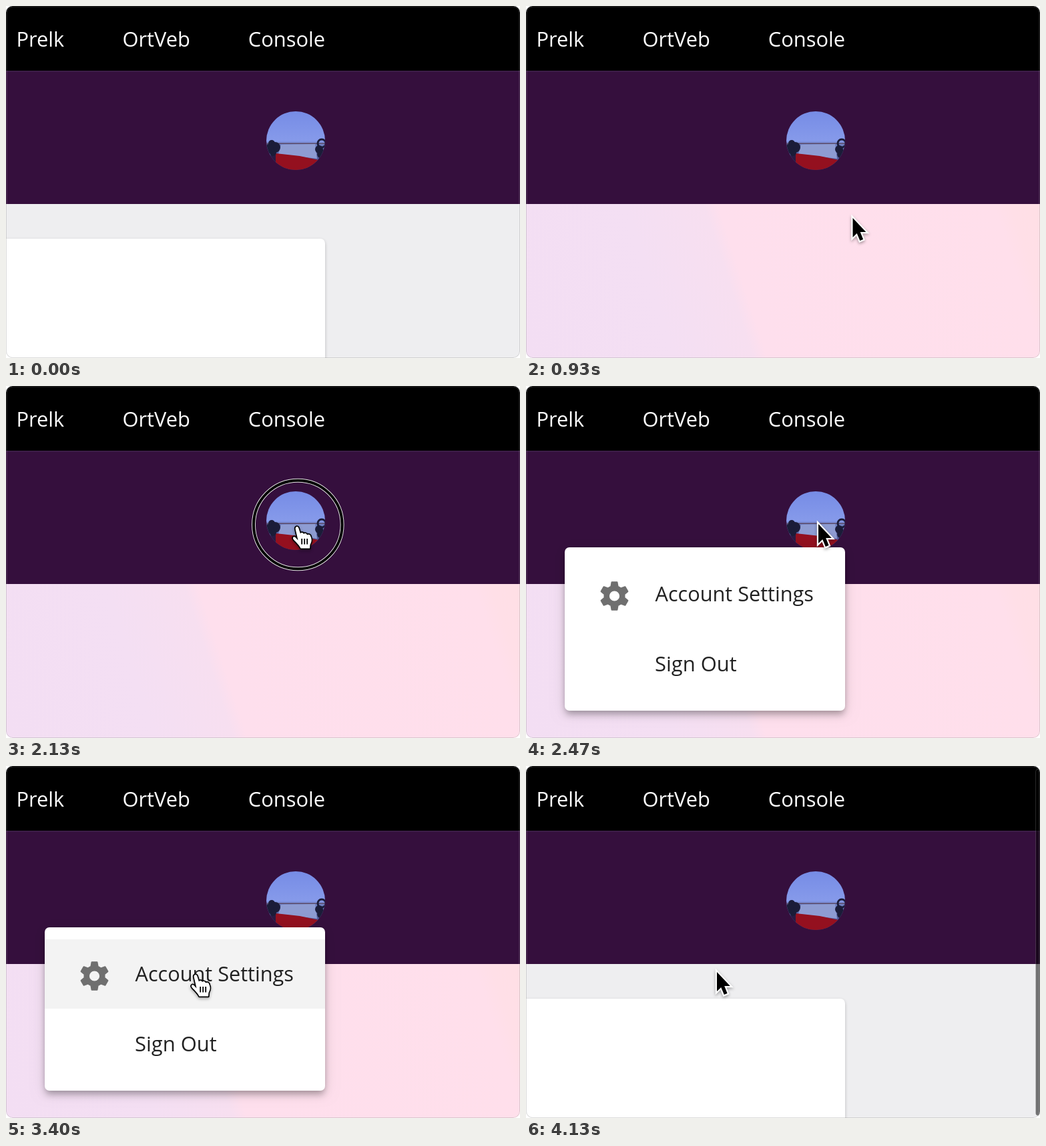
An HTML page with a canvas for the animation above (4.19 s loop, 770 by 528 pixels).

```html
<!DOCTYPE html>
<html lang="en">
<head>
<meta charset="utf-8">
<title>Account menu</title>
<style>
  html, body { margin: 0; width: 100%; height: 100%; overflow: hidden; background: #fff; }
  canvas { display: block; }
</style>
</head>
<body>
<canvas id="stage" width="770" height="528"></canvas>
<script>
const W = 770, H = 528, LOOP = 4190, TOP = 297;
const c = document.getElementById('stage').getContext('2d');

// Moments in ms
const T = {
  pink: 925, ring: 2052, open: 2340, hand: 2900, hover: 2960,
  ripple: 3611, close: 3810, grey: 3965
};

// Pointer path: time, x, y
const PATH = [
  [930, 489.5, 318], [1650, 438, 207], [2480, 438, 207],
  [2930, 310, 276], [3400, 286, 309]
];

const HAND = new Path2D(
  'M9.5 23 L5.7 6.5 C4.8 2.5 9 .8 10.3 4.5 L13 13 C13.5 10.8 17.5 10.8 18 13.8 ' +
  'C19 11.8 22.5 12.2 23 15 C24.5 13.5 28 14 28.4 17.5 C30.5 22 30 25 27.5 29.5 ' +
  'L27 35 H13.5 C12 31 7 26.5 3 22 C.5 19 3 16.5 5.5 18.5 Z');
const ARROW = new Path2D('M0 0 V29 L6.2 23 L10.8 34 L15.6 32 L11.2 21 H19.8 Z');
const GEAR = gearPath();

const clamp = v => Math.max(0, Math.min(1, v));
const smooth = p => p * p * (3 - 2 * p);

// cubic-bezier(0, 0, .2, 1)
function decelerate(x) {
  if (x <= 0) return 0;
  if (x >= 1) return 1;
  let lo = 0, hi = 1;
  for (let i = 0; i < 20; i++) {
    const u = (lo + hi) / 2;
    if (.6 * u * u * (1 - u) + u ** 3 < x) lo = u; else hi = u;
  }
  return 3 * lo * lo * (1 - lo) + lo ** 3;
}

function gearPath() {
  const path = new Path2D();
  path.arc(0, 0, 7.4, 0, 7);
  path.closePath();
  for (let i = 0; i < 6; i++) {
    const tooth = new Path2D('M-3.1 -5 L-2.3 -9.6 Q-2.2 -10 -1.8 -10 H1.8 Q2.2 -10 2.3 -9.6 L3.1 -5 Z');
    path.addPath(tooth, new DOMMatrix().rotate(i * 60));
  }
  path.moveTo(3.5, 0);
  path.arc(0, 0, 3.5, 0, -2 * Math.PI, true);
  return path;
}

function rect(x, y, w, h, color) {
  c.fillStyle = color;
  c.fillRect(x, y, w, h);
}

function box(x, y, w, h, r) {
  c.beginPath();
  c.roundRect(x, y, w, h, r);
}

function circle(x, y, r) {
  c.beginPath();
  c.arc(x, y, r, 0, 2 * Math.PI);
}

function poly(color, ...pts) {
  c.fillStyle = color;
  c.beginPath();
  for (let i = 0; i < pts.length; i += 2) c.lineTo(pts[i], pts[i + 1]);
  c.fill();
}

function text(str, x, y, size, color) {
  c.font = `${size}px "Open Sans", "Noto Sans", sans-serif`;
  c.fillStyle = color;
  c.fillText(str, x, y);
}

// Draws only the shadow; the shape itself lies off stage.
function shadow(x, y, w, h, r, dy, blur, spread, alpha, scale = 1) {
  const far = 3000;
  c.save();
  c.shadowColor = `rgba(0,0,0,${alpha})`;
  c.shadowBlur = blur * scale;
  c.shadowOffsetX = far * scale;
  c.shadowOffsetY = dy * scale;
  c.fillStyle = '#000';
  box(x - far - spread, y - spread, w + 2 * spread, h + 2 * spread, r);
  c.fill();
  c.restore();
}

function drawPage(pink) {
  if (pink) {
    const g = c.createLinearGradient(-161.8, 52, 619, -199);
    [[0, '#f3def3'], [.27, '#f4dff3'], [.405, '#f7dff0'], [.43, '#fedfed'],
     [.91, '#ffdfeb'], [.94, '#ffdfe7'], [1, '#ffdfe5']].forEach(s => g.addColorStop(...s));
    rect(0, TOP, W, H - TOP, g);
    return;
  }
  rect(0, TOP, W, H - TOP, '#eeeef0');
  shadow(-40, 349, 518, 260, 7, 2, 5, 0, .22);
  c.fillStyle = '#fff';
  box(-40, 349, 518, 260, 7);
  c.fill();
}

function drawHeader() {
  rect(0, 0, W, 98, '#000');
  rect(0, 98, W, TOP - 98, '#350f3d');
  rect(0, 97, W, 2, '#3c1c48');
  text('Prelk', 15.5, 61, 30.8, '#fff');
  text('OrtVeb', 174.5, 61, 30.8, '#fff');
  text('Console', 362.8, 61, 30.8, '#fff');
}

function drawAvatar() {
  c.save();
  circle(434, 202, 44);
  c.clip();
  const sky = c.createLinearGradient(0, 158, 0, 246);
  sky.addColorStop(0, '#768ce6');
  sky.addColorStop(.5, '#869aea');
  sky.addColorStop(.56, '#6f80c4');
  sky.addColorStop(1, '#3a3f78');
  rect(390, 158, 88, 88, sky);
  poly('#8e9cd2', 412, 208, 463, 207, 466, 229, 408, 222);
  rect(390, 205.5, 88, 1.5, '#5c4a66');
  poly('#94101f', 404, 221, 440, 225, 468, 231, 468, 250, 404, 250);
  poly('#2a1a42', 390, 226, 404, 222, 404, 250, 390, 250);
  c.fillStyle = '#1b1c38';
  for (const [x, y, r] of [[398, 206, 5], [403, 212, 8], [394, 214, 7], [400, 220, 5], [469, 215, 6], [473, 222, 7]]) {
    circle(x, y, r);
    c.fill();
  }
  c.strokeStyle = '#1b1c38';
  c.lineWidth = 3;
  circle(473, 206, 6);
  c.stroke();
  c.restore();
}

function drawMenu(t) {
  const shown = clamp((t - T.open) / 125);
  const alpha = Math.min(shown, 1 - clamp((t - T.close) / 110));
  if (alpha <= 0) return;
  const s = .8 + .2 * decelerate(shown);
  const x = 58, y = 242, w = 420, h = 245;
  c.save();
  c.globalAlpha = alpha;
  c.translate(x + w, y);
  c.scale(s, s);
  c.translate(-x - w, -y);
  shadow(x, y, w, h, 7, 4, 8, -2, .2, s);
  shadow(x, y, w, h, 7, 8, 10, 0, .14, s);
  shadow(x, y, w, h, 7, 2, 20, 0, .12, s);
  c.fillStyle = '#fff';
  box(x, y, w, h, 7);
  c.fill();
  if (t >= T.hover) rect(x, 260, w, 104, '#f3f3f3');
  if (t >= T.ripple) {
    c.save();
    c.beginPath();
    c.rect(x, 260, w, 104);
    c.clip();
    c.fillStyle = 'rgba(0,0,0,.105)';
    circle(285, 310, 233 * decelerate((t - T.ripple) / 225));
    c.fill();
    c.restore();
  }
  c.save();
  c.translate(132.5, 315);
  c.scale(2.17, 2.17);
  c.fillStyle = '#6f6f6f';
  c.fill(GEAR);
  c.restore();
  text('Account Settings', 193.5, 323, 30.7, '#212121');
  text('Sign Out', 193, 428, 30.9, '#212121');
  c.restore();
}

function drawRing(t) {
  const p = (t - T.ring) / 140;
  if (p <= 0 || p > 1.5) return;
  const r = 68.8 * (1 - (1 - Math.min(p, 1)) ** 4);
  c.save();
  c.globalAlpha = 1 - clamp((p - 1) / .5);
  circle(437.3, 208, r);
  for (const [color, width] of [['#e4e4e4', 5.9], ['#000', 4]]) {
    c.strokeStyle = color;
    c.lineWidth = width;
    c.stroke();
  }
  c.restore();
}

function pointerAt(t) {
  let i = 0;
  while (i < PATH.length - 2 && t >= PATH[i + 1][0]) i++;
  const [t0, x0, y0] = PATH[i], [t1, x1, y1] = PATH[i + 1];
  const p = smooth(clamp((t - t0) / (t1 - t0)));
  return [x0 + (x1 - x0) * p, y0 + (y1 - y0) * p];
}

function drawPointer(t) {
  if (t < T.pink) return;
  const [x, y] = pointerAt(t);
  const onAvatar = t < T.open && Math.hypot(x - 434, y - 202) < 46;
  const onItem = t >= T.hand && t < T.close + 60;
  c.save();
  c.lineJoin = 'round';
  c.shadowColor = 'rgba(0,0,0,.35)';
  c.shadowBlur = 4;
  c.shadowOffsetY = 2;
  if (onAvatar || onItem) {
    c.translate(x - 10, y + 1.5);
    c.strokeStyle = '#000';
    c.lineWidth = 3.4;
    c.stroke(HAND);
    c.shadowColor = 'transparent';
    c.fillStyle = '#fff';
    c.fill(HAND);
    c.lineWidth = 1.8;
    c.beginPath();
    for (const lx of [15.2, 19.2, 23.2]) {
      c.moveTo(lx, 20.5);
      c.lineTo(lx, 29);
    }
    c.stroke();
  } else {
    c.translate(x, y);
    c.lineJoin = 'miter';
    c.miterLimit = 3;
    c.strokeStyle = '#fff';
    c.lineWidth = 4.4;
    c.stroke(ARROW);
    c.shadowColor = 'transparent';
    c.fillStyle = '#000';
    c.fill(ARROW);
  }
  c.restore();
}

function drawScrollbar(t) {
  const p = clamp((t - T.grey) / 60);
  if (p <= 0) return;
  c.save();
  c.globalAlpha = p;
  box(763.5, 4.5, 8, 520, 4);
  c.fillStyle = 'rgba(0,0,0,.52)';
  c.fill();
  c.strokeStyle = 'rgba(255,255,255,.16)';
  c.lineWidth = 1;
  c.stroke();
  c.restore();
}

function drawFrame() {
  c.lineWidth = 1;
  box(.5, .5, W - 1, H - 1, 10);
  c.strokeStyle = 'rgba(0,0,0,.15)';
  c.stroke();
  box(1, 1, W - 2, H - 2, 9.5);
  c.strokeStyle = 'rgba(255,255,255,.2)';
  c.stroke();
}

function draw(t) {
  c.clearRect(0, 0, W, H);
  c.save();
  box(0, 0, W, H, 10);
  c.clip();
  drawPage(t >= T.pink && t < T.grey);
  drawHeader();
  drawAvatar();
  drawMenu(t);
  drawScrollbar(t);
  drawRing(t);
  drawPointer(t);
  drawFrame();
  c.restore();
}

const start = performance.now();
function tick() {
  draw((performance.now() - start) % LOOP);
  requestAnimationFrame(tick);
}
tick();
</script>
</body>
</html>
```
